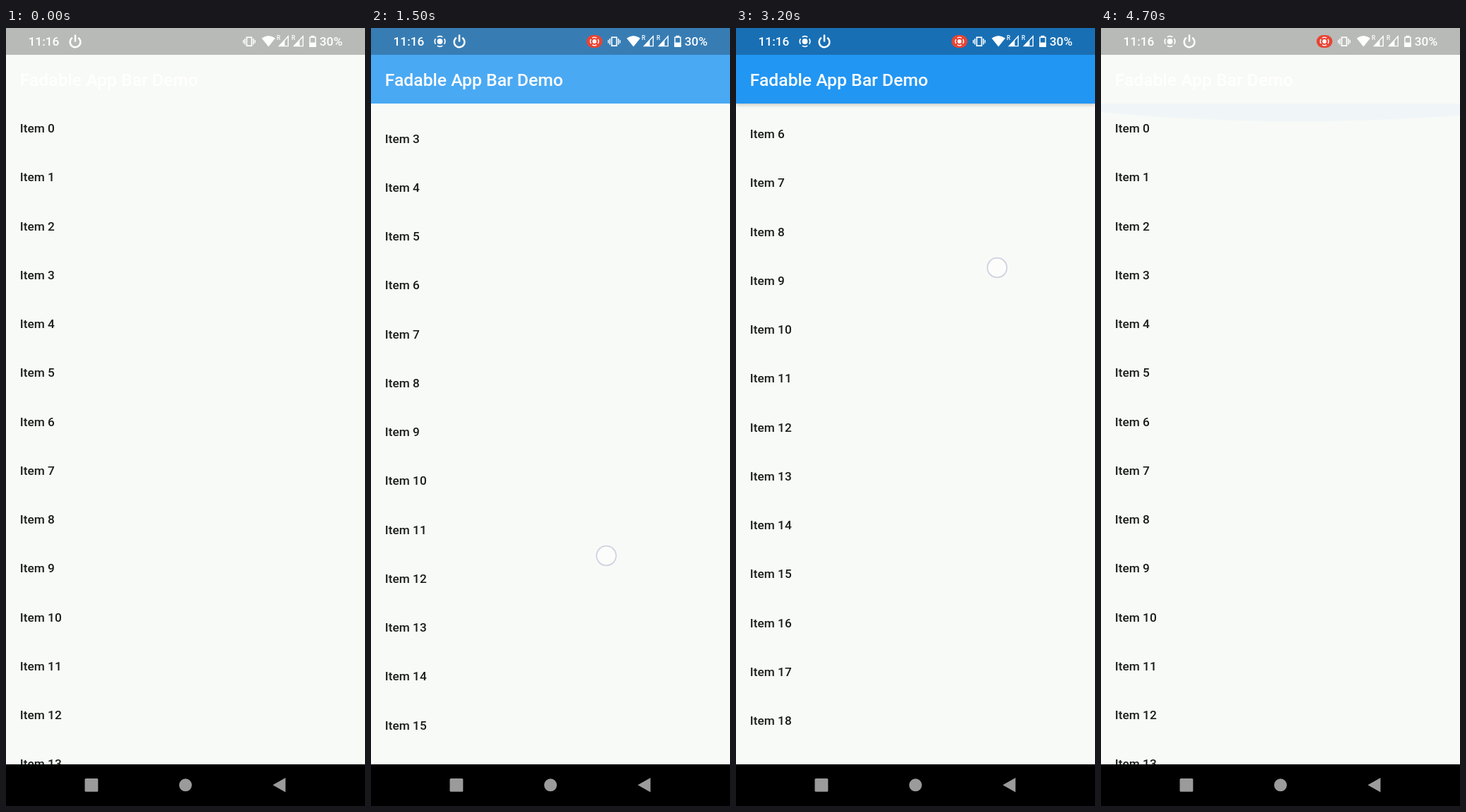
Animation of 508 by 1102 pixels, one loop 5400 ms. Source, as an HTML page with a canvas:

```html
<!DOCTYPE html>
<html lang="en">
<head>
<meta charset="utf-8">
<title>Fadable App Bar Demo</title>
<style>
html, body { margin: 0; width: 100%; height: 100%; overflow: hidden; background: #f8faf7; }
canvas { display: block; }
</style>
</head>
<body>
<canvas id="stage" width="508" height="1102"></canvas>
<script>
const W = 508, H = 1102, LOOP = 5400, STEP = 100;
const STATUS_H = 38, BAR_H = 107, NAV_Y = 1043;
const PITCH = 69.25, FADE = 240;
const FONT = 'Roboto, "Noto Sans", sans-serif';
const ctx = document.getElementById('stage').getContext('2d');

// Tracks: [time, value, ...] with linear steps between keys.
const SCROLL = [[700, 0], [800, 8], [1100, 85.7], [1900, 301], [2200, 385], [2500, 453],
  [2600, 460.8], [2700, 465], [2800, 466], [3000, 466], [3100, 455], [3300, 360],
  [3600, 185], [3900, 2.3], [4000, 0]];
const SHADOW = [[1600, 0], [1800, 1], [4000, 1], [4200, 0]];
const PULL = [[3900, 0, 0], [4000, 0.6, 0.05], [4200, 0.85, 0.12], [4400, 0.9, 0.135]];
const DRAGS = [
  [[600, 279, 957], [700, 279, 957], [800, 281, 937], [1100, 302, 859], [1900, 364, 636],
    [2200, 389, 556], [2500, 414, 493], [2600, 418, 485.5], [2700, 420, 481]],
  [[3100, 377, 292], [3300, 362, 387], [3600, 342, 562], [3900, 321.5, 741],
    [4200, 301, 905], [4300, 297, 931]]
];

function track(keys, t) {
  if (t <= keys[0][0]) return keys[0].slice(1);
  for (let i = 1; i < keys.length; i++) {
    const a = keys[i - 1], b = keys[i];
    if (t <= b[0]) {
      const k = (t - a[0]) / (b[0] - a[0]);
      return a.slice(1).map((v, j) => v + (b[j + 1] - v) * k);
    }
  }
  return keys[keys.length - 1].slice(1);
}

function rect(color, x, y, w, h) {
  ctx.fillStyle = color;
  ctx.fillRect(x, y, w, h);
}

function text(str, x, y, size, color) {
  ctx.font = '500 ' + size + 'px ' + FONT;
  ctx.fillStyle = color;
  ctx.fillText(str, x, y);
}

function poly(...p) {
  ctx.beginPath();
  for (let i = 0; i < p.length; i += 2) ctx.lineTo(p[i], p[i + 1]);
  ctx.closePath();
}

function disc(x, y, r) {
  ctx.beginPath();
  ctx.arc(x, y, r, 0, Math.PI * 2);
  ctx.fill();
}

function arc(x, y, r, from, to, width) {
  ctx.lineWidth = width;
  ctx.beginPath();
  ctx.arc(x, y, r, from, to);
  ctx.stroke();
}

function line(x1, y1, x2, y2, width) {
  ctx.lineWidth = width;
  ctx.beginPath();
  ctx.moveTo(x1, y1);
  ctx.lineTo(x2, y2);
  ctx.stroke();
}

function list(scroll) {
  for (let i = 0; i < 24; i++) {
    const y = 148.2 + i * PITCH - scroll;
    if (y > BAR_H - 8 && y < NAV_Y + 20) text('Item ' + i, 19.8, y, 17.3, '#1a1c1b');
  }
}

function glow(t) {
  if (t < 4000) return;
  let [size, alpha] = track(PULL, t);
  if (t > 4400) {
    const k = (1 - (t - 4400) / 600) ** 2;
    size *= k * 1.1;
    alpha *= k;
  }
  const h = W * 0.201, r = W * 1.5;
  ctx.save();
  ctx.translate(0, BAR_H);
  ctx.scale(1, size);
  ctx.beginPath();
  ctx.rect(0, 0, W, h);
  ctx.clip();
  ctx.fillStyle = 'rgba(33,150,243,' + alpha + ')';
  disc(280, h - r, r);
  ctx.restore();
}

function barShadow(k) {
  if (k <= 0) return;
  ctx.save();
  ctx.shadowColor = 'rgba(0,0,0,' + 0.28 * k + ')';
  ctx.shadowBlur = 6;
  ctx.shadowOffsetY = 2001;
  rect('#000', 0, -2000, W, BAR_H);
  ctx.restore();
}

function recordIcon(x, y, r, dot, width) {
  disc(x, y, dot);
  for (let i = 0; i < 4; i++) {
    const a = i * Math.PI / 2;
    arc(x, y, r, a - 0.55, a + 0.55, width);
  }
}

function powerIcon(x) {
  arc(x, 19.8, 7.4, -Math.PI / 2 + 0.6, Math.PI * 1.5 - 0.6, 2.5);
  line(x, 9.5, x, 19.5, 2.5);
}

function signalIcon(x) {
  text('R', x - 1, 17, 8.5, '#fff');
  ctx.lineWidth = 1.4;
  poly(x + 2.5, 25.6, x + 15.3, 25.6, x + 15.3, 11.8);
  ctx.stroke();
  poly(x + 2, 26, x + 10.5, 26, x + 10.5, 17);
  ctx.fill();
}

function statusIcons(recording) {
  ctx.fillStyle = ctx.strokeStyle = '#fff';
  powerIcon(recording ? 125 : 98);
  if (recording) {
    recordIcon(97.5, 19, 7.2, 3.9, 1.7);
    ctx.fillStyle = '#e94433';
    ctx.beginPath();
    ctx.roundRect(305, 10, 22.5, 18, 9);
    ctx.fill();
    ctx.fillStyle = '#fff';
    recordIcon(316.2, 19, 5.8, 2.9, 1.4);
  }
  // vibrate
  ctx.lineWidth = 1.7;
  ctx.strokeRect(340.6, 13.2, 7, 12);
  line(338, 15, 338, 23.5, 1.5);
  line(350.2, 15, 350.2, 23.5, 1.5);
  line(335.8, 17, 335.8, 21.5, 1.4);
  line(352.4, 17, 352.4, 21.5, 1.4);
  // wifi
  ctx.beginPath();
  ctx.moveTo(371.4, 26.4);
  ctx.lineTo(361.8, 14.6);
  ctx.quadraticCurveTo(371.4, 7.4, 381, 14.6);
  ctx.fill();
  signalIcon(384);
  signalIcon(405);
  // battery
  ctx.fillStyle = '#fff';
  ctx.fillRect(431.5, 10.8, 5, 2.2);
  ctx.fillRect(429.3, 20.5, 9.4, 6);
  ctx.lineWidth = 1.5;
  ctx.strokeRect(430, 13.2, 8, 13);
}

function navBar() {
  rect('#000', 0, NAV_Y, W, H - NAV_Y);
  ctx.fillStyle = '#9b9b9b';
  ctx.beginPath();
  ctx.roundRect(111.5, 1063, 18.8, 18.8, 1.5);
  ctx.fill();
  disc(254, 1072.3, 9);
  poly(377.5, 1072.3, 395.5, 1062, 395.5, 1082.6);
  ctx.fill();
}

function finger(t) {
  const drag = DRAGS.find(d => t >= d[0][0] && t <= d[d.length - 1][0]);
  if (!drag) return;
  const [x, y] = track(drag, t);
  ctx.fillStyle = 'rgba(255,255,255,0.5)';
  disc(x, y, 14);
  ctx.strokeStyle = '#cfd2e1';
  arc(x, y, 13.8, 0, Math.PI * 2, 1.8);
}

function draw(t) {
  const [scroll] = track(SCROLL, t);
  const fade = Math.min(1, scroll / FADE);
  rect('#f8faf7', 0, 0, W, H);

  ctx.save();
  ctx.beginPath();
  ctx.rect(0, BAR_H, W, NAV_Y - BAR_H);
  ctx.clip();
  list(scroll);
  glow(t);
  ctx.restore();

  barShadow(track(SHADOW, t)[0]);
  rect('rgba(33,150,243,' + fade + ')', 0, 0, W, BAR_H);
  text('Fadable App Bar Demo', 19.8, 81.8, 24.7, '#fff');
  rect('rgba(0,0,0,0.26)', 0, 0, W, STATUS_H);
  text('11:16', 31.5, 25.4, 17.3, '#fff');
  text('30%', 443.8, 25.4, 17.3, '#fff');
  statusIcons(t >= 300);
  navBar();
  finger(t);
}

const start = performance.now();
function tick() {
  const t = (performance.now() - start) % LOOP;
  draw(Math.min(4700, Math.floor(t / STEP) * STEP));
  requestAnimationFrame(tick);
}
tick();
</script>
</body>
</html>
```
